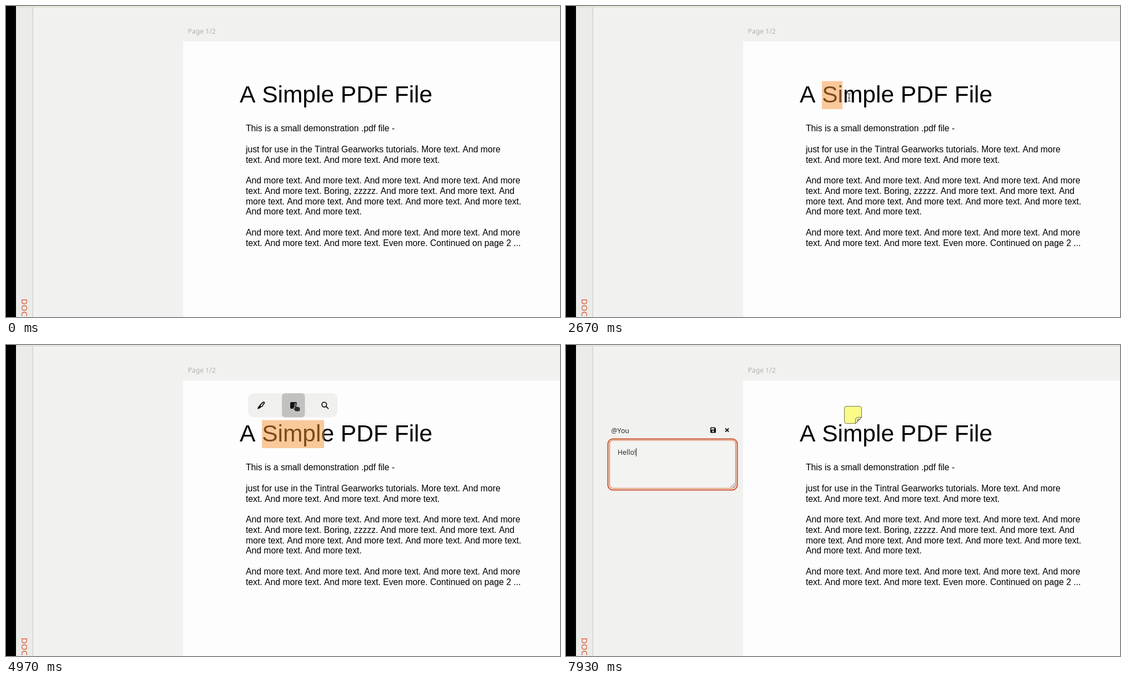
An HTML page that plays this animation: 998x561 px, repeating every 8 s.

```html
<!DOCTYPE html>
<html lang="en">
<head>
<meta charset="utf-8">
<title>PDF notes</title>
<style>
  html, body { margin: 0; width: 100%; height: 100%; overflow: hidden; background: #f1f1ef; }
  svg { display: block; width: 100%; height: 100%; }
  .ui { font: 12.3px "Noto Sans", "Open Sans", sans-serif; }
  .pdf { font-family: "Liberation Sans", Arial, sans-serif; font-kerning: none; }
</style>
</head>
<body>
<svg viewBox="0 0 998 561" xmlns="http://www.w3.org/2000/svg">
  <defs>
    <g id="disk">
      <path fill-rule="evenodd" d="M1 0H8L10 2V9Q10 10 9 10H1Q0 10 0 9V1Q0 0 1 0ZM1.6 1.6V4H7V1.6ZM5 5.4A1.6 1.6 0 1 0 5 8.6A1.6 1.6 0 1 0 5 5.4Z"/>
    </g>
  </defs>

  <rect width="998" height="561" fill="#f1f1ef"/>
  <rect x="18" width="30" height="561" fill="#ebebea"/>
  <rect x="48" y="2" width="1" height="559" fill="#c9c9c6"/>
  <rect x="18" y="1" width="980" height="1.3" fill="#d9d9c9"/>
  <rect width="18" height="561" fill="#000"/>
  <text class="ui" transform="translate(28 528) rotate(90)" style="font-size:15px" fill="#d9562f">DOC</text>
  <text class="ui" x="327.5" y="50" style="font-size:12.2px" fill="#b3b3b2">Page 1/2</text>

  <rect x="319" y="64" width="679" height="497" fill="#fdfdfd"/>
  <text class="pdf" x="421" y="174" font-size="42.5">A Simple PDF File</text>
  <g id="body" class="pdf" font-size="15.72"></g>
  <rect id="mark" x="461" y="135.5" height="50.5" fill="#f6963a" opacity=".5"/>

  <g id="bar">
    <rect x="436" y="87" width="161" height="43.5" rx="10" fill="#f0f0ef"/>
    <rect id="hover" x="497" y="87" width="41.5" height="43.5" rx="6" fill="#c1c1c0"/>
    <g fill="none" stroke="#111" stroke-width="1.7" stroke-linejoin="round" stroke-linecap="round">
      <path d="M458 108L463.5 103Q465.5 102.500 465.500 104.500L461 111L457.500 112Z"/>
      <path d="M457 109L454.500 112L453.500 115L457 114L459.500 111.500Z" fill="#111" stroke-width="1"/>
      <circle cx="573.300" cy="107.500" r="4.300"/>
      <path d="M576.600 110.800L580.500 114.700"/>
    </g>
    <path d="M514 103H522Q524 103 524 105V110L519 115H514Q512 115 512 113V105Q512 103 514 103Z" fill="#111"/>
  </g>

  <g id="note">
    <path d="M505 110.500H529Q532.500 110.500 532.500 114V131L522 141.500H505Q501.500 141.500 501.500 138V114Q501.500 110.500 505 110.500Z" fill="#fbfb88" stroke="#77775f"/>
    <path d="M521.500 141.500V135Q521.500 130.500 526 130.500H532.500Z" fill="#fdfdc0" stroke="#66665a"/>
    <path d="M524.500 137V135Q524.500 133.500 526 133.500H528.500Z" fill="#fbfb88" stroke="#66665a" stroke-width=".8"/>
    <text class="ui" x="81.500" y="158.500" fill="#2b2b2b">@You</text>
    <rect id="off" x="253" y="143.500" width="24" height="20" rx="4" fill="#e5e5e4"/>
    <use id="save" href="#disk" x="260" y="148.500"/>
    <path d="M287 150.500L293.200 156.700M293.200 150.500L287 156.700" stroke="#111" stroke-width="1.800"/>
    <rect id="ring" x="75.500" y="169.500" width="233" height="92" rx="9" fill="none" stroke="#cb522b" stroke-width="2"/>
    <rect x="78.500" y="172" width="227" height="86.500" rx="6.500" fill="#f3f3f1" stroke="#df7344" stroke-width="1.200"/>
    <path d="M296 257L304 249M299.500 257L304 252.500M302.500 257L304 255.500" stroke="#777" stroke-width="1"/>
    <text id="entry" class="ui" x="93" y="198"></text>
    <rect id="caret" y="186" width="1" height="15" fill="#222"/>
  </g>

  <g id="cursor">
    <path id="arrow" d="M0 0V15.500L3.500 12.300L5.700 17.300L8 16.300L5.900 11.500H10Z" fill="#2d2d2d" stroke="#fff" stroke-width=".9"/>
    <g id="beam" fill="none">
      <path d="M-3 -7Q0 -7 0 -5Q0 -7 3 -7M0 -5V5M-3 7Q0 7 0 5Q0 7 3 7M-2 1H2" stroke="#fff" stroke-width="2.600" opacity=".75"/>
      <path d="M-3 -7Q0 -7 0 -5Q0 -7 3 -7M0 -5V5M-3 7Q0 7 0 5Q0 7 3 7M-2 1H2" stroke="#444" stroke-width="1.200"/>
    </g>
    <path id="hand" d="M-1 1Q-1 -.6 .4 -.6T1.800 1V5Q3.200 4.200 4.200 5.300Q5.600 4.600 6.500 5.800Q9 5.300 9 7.500V11L7.800 14H.5L-3.800 9Q-4.200 7.300 -2.700 7.300L-1 8.500Z" fill="#2d2d2d" stroke="#e9e9e9" stroke-width=".8"/>
  </g>
</svg>
<script>
const LOOP = 8000;
const $ = id => document.getElementById(id);
const show = (id, on) => $(id).setAttribute("visibility", on ? "inherit" : "hidden");
const set = (id, name, value) => $(id).setAttribute(name, value);

const more = n => Array(n).fill("And more text.").join(" ");
const lines = [
  "This is a small demonstration .pdf file -", "",
  "just for use in the Tintral Gearworks tutorials. More text. And more",
  "text. " + more(3), "",
  more(4) + " And more",
  "text. And more text. Boring, zzzzz. " + more(2) + " And",
  "more text. " + more(4),
  more(2), "",
  more(4) + " And more",
  "text. " + more(2) + " Even more. Continued on page 2 ..."
];
lines.forEach((line, i) => {
  const text = document.createElementNS("http://www.w3.org/2000/svg", "text");
  text.setAttribute("x", 432);
  text.setAttribute("y", 226.4 + i * 18.74);
  text.textContent = line;
  $("body").append(text);
});

// Pointer stops: time, x, y
const path = [
  [1000, 1000, 548], [1250, 880, 420], [1700, 560, 220], [2050, 466, 166],
  [2300, 463, 165], [2670, 510, 165], [3200, 557, 161], [3600, 579, 159],
  [4250, 579, 159], [4750, 521, 106], [5080, 521, 106], [5600, 343, 184],
  [5720, 343, 184], [6150, 200, 205]
];
const edges = [461, 488, 498, 535, 562, 573];
const PRESS = 2250, RELEASE = 4000, NOTE = 5070, FOCUS = 6300, TYPE = 6800, KEY = 150;
const word = "Hello!";

function pointer(t) {
  const i = path.findIndex(p => p[0] > t);
  if (i < 0) return path[path.length - 1].slice(1);
  if (i === 0) return path[0].slice(1);
  const [t0, x0, y0] = path[i - 1], [t1, x1, y1] = path[i];
  const u = (t - t0) / (t1 - t0), k = u * u * (3 - 2 * u);
  return [x0 + (x1 - x0) * k, y0 + (y1 - y0) * k];
}

function draw(t) {
  const [x, y] = pointer(t);
  const inside = (l, top, r, b) => x >= l && x <= r && y >= top && y <= b;
  const bar = t >= RELEASE && t < NOTE, note = t >= NOTE;

  // Selection snaps to the nearest letter edge
  const end = edges.reduce((a, b) => Math.abs(b - x) < Math.abs(a - x) ? b : a);
  set("mark", "width", t < PRESS || note ? 0 : (t < RELEASE ? end : 573) - 461);

  const over = bar && inside(497, 87, 538, 130);
  show("bar", bar);
  show("hover", over);
  show("note", note);

  const count = Math.max(0, Math.min(word.length, Math.floor((t - TYPE) / KEY) + 1));
  const focus = t >= FOCUS;
  show("ring", focus);
  show("off", note && !count);
  set("save", "fill", count ? "#111" : "#bcbcbc");
  $("entry").textContent = count ? word.slice(0, count) : "Your notes";
  set("entry", "fill", count ? "#2b2b2b" : "#a6a9ad");
  set("caret", "x", 93 + (count ? $("entry").getComputedTextLength() : 0));
  show("caret", focus && (count > 0 || (t - FOCUS) % 1000 < 500));
  if (!note) ["ring", "off", "caret"].forEach(id => show(id, false));

  const beam = !over && (inside(421, 136, 767, 186) || inside(432, 212, 930, 436) ||
    (note && inside(78, 172, 306, 258)));
  show("cursor", t >= 1000 && t < TYPE);
  set("cursor", "transform", `translate(${x} ${y})`);
  set("hand", "display", over ? "inline" : "none");
  set("beam", "display", beam ? "inline" : "none");
  set("arrow", "display", over || beam ? "none" : "inline");
}

const start = performance.now();
function frame() {
  draw((performance.now() - start) % LOOP);
  requestAnimationFrame(frame);
}
draw(0);
requestAnimationFrame(frame);
</script>
</body>
</html>
```
